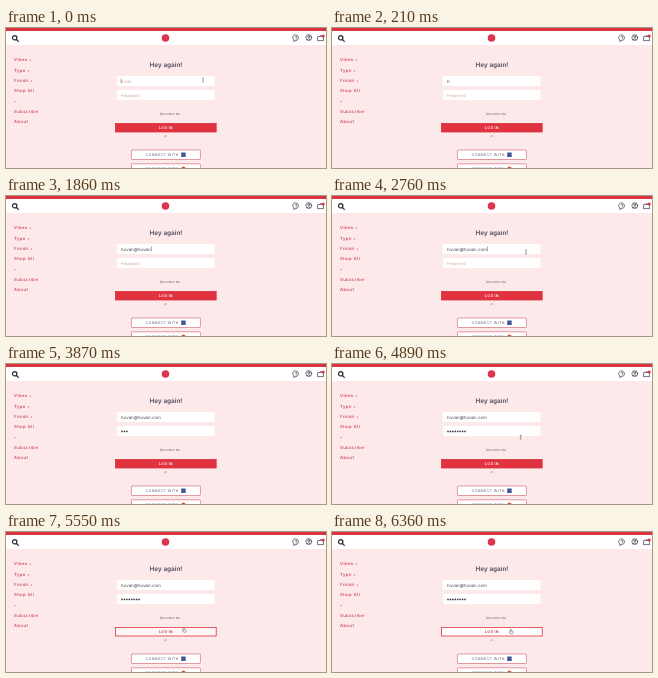
An HTML page for the animation above (8 s loop, 320 by 140 pixels).

```html
<!DOCTYPE html>
<html lang="en">
<head>
<meta charset="utf-8">
<title>Log in</title>
<style>
  html, body { margin: 0; width: 100%; height: 100%; overflow: hidden; background: #fde9ea; }
  svg { display: block; width: 100vw; height: 100vh; }
  text { font-family: Inter, "Open Sans", sans-serif; text-rendering: geometricPrecision; white-space: pre; }
  .menu { font-size: 4.2px; letter-spacing: .45px; font-weight: 500; fill: #c9364b; }
  .title { font-size: 6.4px; font-weight: 600; fill: #4d4b5a; }
  .entry { font-size: 4.4px; fill: #4d4650; }
  .hint { font-size: 4px; fill: #d3a0a5; }
  .small { font-size: 3px; fill: #6b6470; }
  .social { font-size: 3.6px; letter-spacing: .4px; fill: #5d586a; }
  .login { font-size: 3.7px; font-weight: 600; letter-spacing: .25px; }
  .mid { text-anchor: middle; }
  .icon { fill: none; stroke: #4a4456; stroke-width: .75; stroke-linecap: round; stroke-linejoin: round; }
</style>
</head>
<body>
<svg viewBox="0 0 320 140" preserveAspectRatio="none">
  <rect width="320" height="140" fill="#fde9ea"/>
  <rect width="320" height="17" fill="#fff"/>
  <rect width="320" height="3" fill="#dc3340"/>

  <g class="icon" style="stroke:#2b2731;stroke-width:1.2">
    <circle cx="8.7" cy="9.8" r="2.2"/>
    <path d="M10.4 11.5 L12.3 13.4"/>
  </g>
  <circle cx="159.5" cy="10" r="3.8" fill="#e0344c"/>
  <g class="icon">
    <path d="M288 12.2 A2.9 2.9 0 1 1 290 12.6 L287.6 13.2 Z"/>
    <path d="M289.3 8.9 Q290.2 7.6 291 8.8 Q291 9.4 290.2 10 M290.2 11.1 v.1"/>
    <circle cx="302.8" cy="9.6" r="2.9"/>
    <circle cx="302.8" cy="8.7" r="1"/>
    <path d="M300.9 11.7 Q302.8 9.7 304.7 11.7"/>
    <path d="M312.2 8.4 h5 l.4 4.2 h-5.8 Z M313.4 8.4 Q314.7 5.8 316 8.4"/>
  </g>
  <circle cx="317.2" cy="8" r="1.6" fill="#e0344c"/>

  <g id="menu" class="menu"></g>
  <text class="title mid" x="160" y="39.3">Hey again!</text>

  <rect x="111" y="48" width="97.5" height="10" fill="#fff"/>
  <rect x="111" y="62" width="97.5" height="10" fill="#fff"/>
  <text class="hint" id="mailHint" x="115" y="54.6">Email</text>
  <text class="hint" id="passHint" x="115" y="68.7">Password</text>
  <text class="entry" id="mail" x="115" y="54.5"></text>
  <g id="dots" fill="#3f3943"></g>
  <rect id="caret" width=".45" height="4.6" fill="#4d4650"/>

  <text class="small mid" x="164" y="86.9">Remember Me</text>
  <rect id="button" x="109.4" y="95.4" width="100.8" height="8.6" stroke="#dd3341" stroke-width=".8"/>
  <text class="login mid" id="login" x="160" y="101.1">LOG IN</text>
  <text class="small mid" x="159.5" y="108.8">or</text>

  <g id="social"></g>

  <path id="beam" d="M-.9 -2 Q0 -2 0 -1.4 Q0 -2 .9 -2 M0 -1.5 V1.5 M-.9 2 Q0 2 0 1.4 Q0 2 .9 2"
        fill="none" stroke="#4a4650" stroke-width=".5"/>
  <path id="hand" d="M-.7 -2.2 Q-.2 -2.7 .2 -2.2 V-.7 L1.7 -.4 Q2.2 -.2 2.1 .4 L1.6 2.2 H-.4 L-1.8 .4 Q-1.7 -.3 -.7 .4 Z"
        fill="#fff" stroke="#4a4650" stroke-width=".5"/>
</svg>
<script>
  const LOOP = 8000;
  const ADDRESS = "huvan@huvan.com";
  const mailTimes = [150, 300, 450, 630, 870, 1290, 1440, 1500, 1560, 1620, 1860, 2250, 2340, 2430, 2490];
  const dotTimes = [3570, 3780, 3870, 3990, 4080, 4170, 4290, 4500];
  const $ = id => document.getElementById(id);

  $("menu").innerHTML = ["Vibes +", "Type +", "Finish +", "Shop All", "–", "Subscribe", "About"]
    .map((label, i) => `<text x="8" y="${33.4 + i * 10.33}">${label.replace("+", '<tspan font-size="3.4">+</tspan>')}</text>`)
    .join("");

  $("social").innerHTML = [122, 135.8].map((y, i) => `
    <rect x="125.4" y="${y}" width="69" height="9.5" rx=".8" fill="#fff" stroke="#d8707b" stroke-width=".7"/>
    <text class="social" x="139.6" y="${y + 6.1}">CONNECT WITH</text>
    ${i ? `<circle cx="177.4" cy="${y + 4.8}" r="2.2" fill="#dd4b3e"/>`
        : `<rect x="175.2" y="${y + 2.5}" width="4.5" height="4.5" fill="#40589b"/>`}`).join("");

  $("dots").innerHTML = dotTimes
    .map((_, i) => `<circle cx="${116 + i * 2.43}" cy="67.4" r=".85"/>`).join("");

  // Pointer legs: start, end, from, to
  const legs = [
    [0, 150, 197, 52, 197, 52],
    [2760, 2940, 194, 56, 191, 67],
    [2940, 3570, 191, 67, 191, 67],
    [4770, 5340, 190, 70, 178, 98],
    [5340, 5790, 178, 98, 178, 98],
    [5790, 5970, 178, 98, 179, 99.6],
    [5970, LOOP, 179, 99.6, 179, 99.6]
  ];
  // Blinking caret: on, off, x, y
  const carets = [
    [0, 150, 114.8, 50.6], [870, 1170, 0, 50.6], [1860, 2070, 0, 50.6],
    [2490, 2850, 0, 50.6], [3090, 3420, 114.8, 64.8]
  ];

  const clamp = v => Math.max(0, Math.min(1, v));
  const mix = (a, b, k) => a + (b - a) * k;
  const blend = (a, b, k) => `rgb(${a.map((v, i) => Math.round(mix(v, b[i], k)))})`;
  const show = (id, on) => { $(id).style.visibility = on ? "visible" : "hidden"; };
  const passed = (times, t) => times.filter(at => at <= t).length;
  const active = (rows, t) => rows.find(([from, to]) => t >= from && t < to);
  const RED = [224, 50, 63], WHITE = [255, 255, 255], INK = [184, 50, 66];

  function drawPointer(t) {
    const leg = active(legs, t);
    const overButton = t >= 5250;
    show("beam", leg && !overButton);
    show("hand", leg && overButton);
    if (!leg) return;
    const [from, to, x0, y0, x1, y1] = leg;
    const p = clamp((t - from) / (to - from));
    const k = p * p * (3 - 2 * p);
    $(overButton ? "hand" : "beam")
      .setAttribute("transform", `translate(${mix(x0, x1, k)} ${mix(y0, y1, k)})`);
  }

  function drawCaret(t) {
    const row = active(carets, t);
    show("caret", row);
    if (!row) return;
    $("caret").setAttribute("x", row[2] || 115.4 + $("mail").getComputedTextLength());
    $("caret").setAttribute("y", row[3]);
  }

  function draw(t) {
    const typed = passed(mailTimes, t), hidden = passed(dotTimes, t);
    $("mail").textContent = ADDRESS.slice(0, typed);
    show("mailHint", !typed);
    show("passHint", !hidden);
    [...$("dots").children].forEach((dot, i) => {
      dot.style.visibility = i < hidden ? "visible" : "hidden";
    });

    const hover = clamp((t - 5265) / 300);
    $("button").setAttribute("fill", blend(RED, WHITE, hover));
    $("login").setAttribute("fill", blend(WHITE, INK, hover));

    drawCaret(t);
    drawPointer(t);
  }

  function tick() {
    draw(performance.now() % LOOP);
    requestAnimationFrame(tick);
  }
  tick();
</script>
</body>
</html>
```
